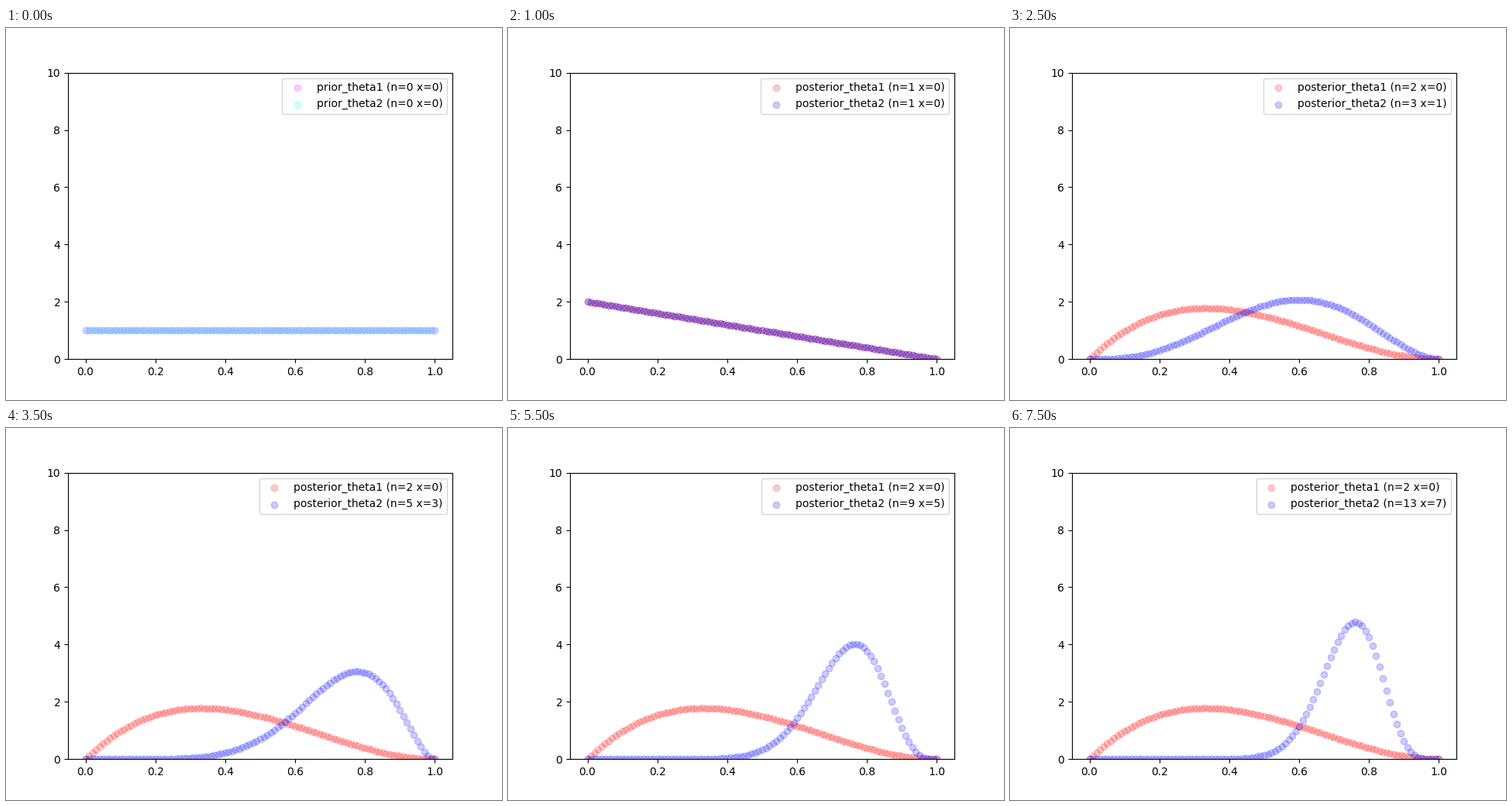
Animation of 640x480 px, one loop 8 s. Source, as a matplotlib script:

```python
from math import factorial

import matplotlib.pyplot as plt
import numpy as np
from matplotlib.animation import FuncAnimation

STEPS = 16

plt.rcParams["text.kerning_factor"] = 6
fig, ax = plt.subplots(figsize=(6.4, 4.8), dpi=100)
theta = np.linspace(0, 1, 101)


def pulls(step):
    """The arms alternate until the first has two pulls; the second gets the rest."""
    first = min(step // 2, 2)
    return first, step - first


def rewards(n):
    """Two misses, a winning streak up to five, then a win on every even pull."""
    return max(0, min(n - 2, max(5, n // 2 + 1)))


def density(n, x):
    """Beta density after n pulls with x rewards; each later pull also adds one to a."""
    a, b = max(n - 1, 0) + x, n - x
    scale = factorial(a + b + 1) / (factorial(a) * factorial(b))
    return scale * theta**a * (1 - theta)**b


def draw(step):
    ax.clear()
    kind, colors = ("posterior", ("red", "blue")) if step else ("prior", ("magenta", "cyan"))
    for arm, (n, color) in enumerate(zip(pulls(step), colors), 1):
        x = rewards(n)
        ax.scatter(theta, density(n, x), color=color, alpha=0.2,
                   label=f"{kind}_theta{arm} (n={n} x={x})")
    ax.set_xlim(-0.05, 1.05)
    ax.set_ylim(0, 10)
    ax.legend(loc="upper right")
    return []


anim = FuncAnimation(fig, draw, frames=STEPS, init_func=lambda: draw(0),
                     interval=500, repeat=True, repeat_delay=0)
plt.show()
```
